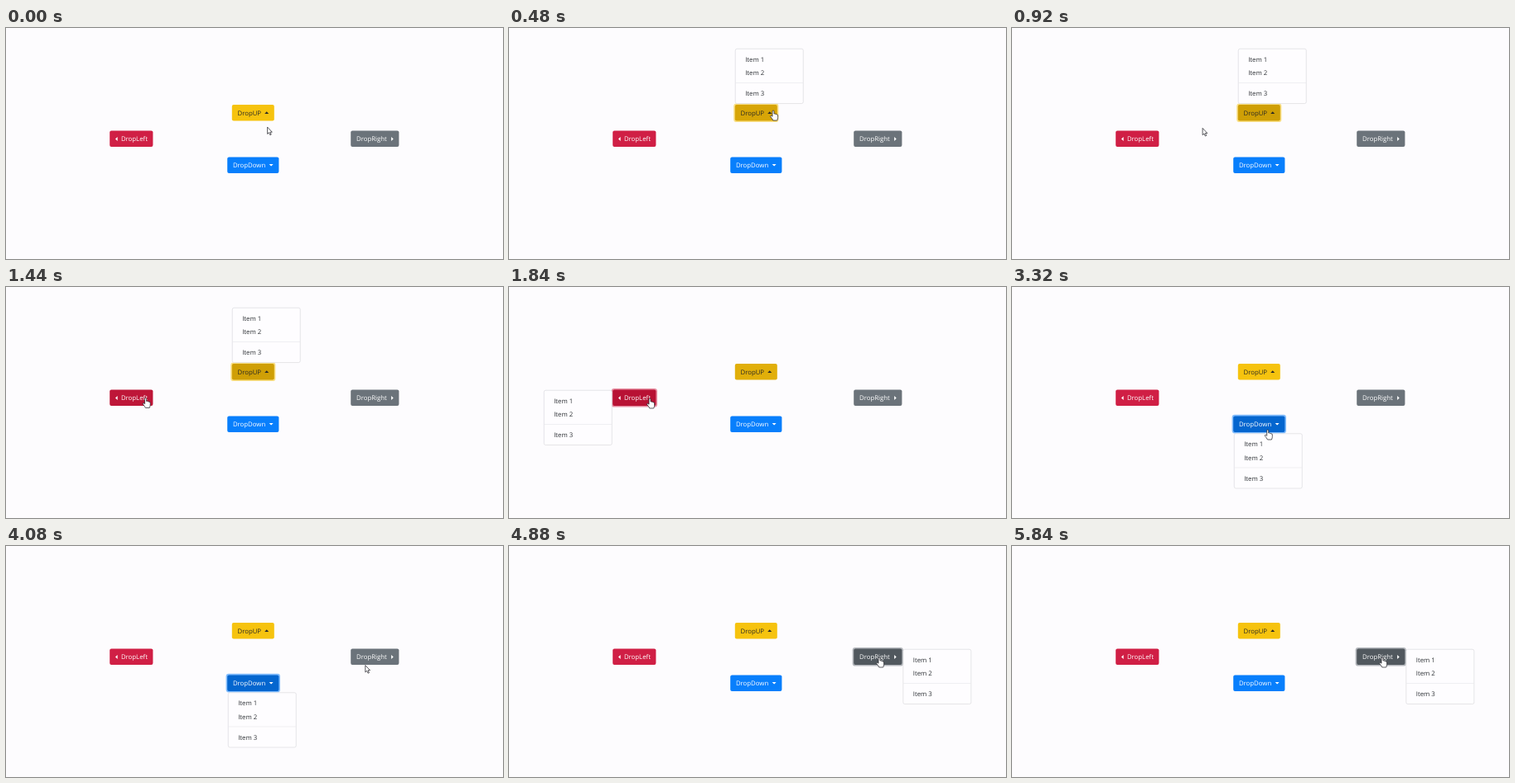
Animation of 600x280 px, one loop 5880 ms. Source, as an HTML page:

```html
<!DOCTYPE html>
<html lang="en">
<head>
<meta charset="utf-8">
<title>Dropdown directions</title>
<style>
  html, body { margin: 0; width: 100%; height: 100%; overflow: hidden; background: #fdfcfe; }
  svg { display: block; width: 100vw; height: 100vh; }
  text { font: 7.8px "Open Sans", "Noto Sans", sans-serif; text-rendering: geometricPrecision; }
</style>
</head>
<body>
<svg id="stage" viewBox="0 0 600 280"></svg>
<script>
const LOOP = 5880, STEP = 40, FADE = 150;
const stage = document.getElementById('stage');

// hover, focus and open are [start, end] times in ms
const buttons = [
  { label: 'DropUP', x: 272.8, y: 93, w: 51, tx: 279.5, caret: 'M312.2 103.9h5l-2.5 -2.6z',
    ink: '#2b2a24', base: [246, 195, 14], over: [224, 173, 8], dark: [207, 159, 6],
    menu: [273, 25], hover: [160, 760], focus: [330, 1660], open: [400, 1770] },
  { label: 'DropLeft', x: 125.2, y: 124.5, w: 52.2, tx: 138.9, caret: 'M134.6 132v5l-2.6 -2.5z',
    ink: '#fff', base: [208, 31, 69], over: [190, 22, 56], dark: [176, 14, 47],
    menu: [42, 125], hover: [1130, 2320], focus: [1660, 3080], open: [1770, 3160] },
  { label: 'DropDown', x: 267.2, y: 156.4, w: 62.2, tx: 273.9, caret: 'M317.6 164.9h5l-2.5 2.6z',
    ink: '#fff', base: [8, 127, 252], over: [6, 108, 220], dark: [4, 102, 207],
    menu: [268, 177.5], hover: [2790, 3715], focus: [3080, 4640], open: [3160, 4720] },
  { label: 'DropRight', x: 416.2, y: 124.5, w: 58.2, tx: 423, caret: 'M465.1 132v5l2.6 -2.5z',
    ink: '#fff', base: [107, 115, 122], over: [91, 98, 104], dark: [81, 88, 94],
    menu: [475.6, 125], hover: [4230, LOOP], focus: [4640, LOOP], open: [4720, LOOP] }
];

// pointer tip: time, x, y
const path = [
  [0, 315.3, 119.7], [60, 315.3, 119.7], [320, 319, 100], [640, 319, 100],
  [920, 229.8, 121], [1200, 160, 131], [1480, 170, 135], [2080, 170, 135],
  [2400, 150, 147], [2640, 237, 168.8], [2960, 308.7, 173], [3640, 308.7, 173],
  [4080, 433.5, 144.2], [4220, 436, 144.2], [4460, 447, 135], [LOOP, 447, 135]
];

function add(parent, tag, attrs, content) {
  const el = document.createElementNS('http://www.w3.org/2000/svg', tag);
  for (const key in attrs) el.setAttribute(key, attrs[key]);
  if (content) el.textContent = content;
  parent.appendChild(el);
  return el;
}

function makeMenu([x, y]) {
  const g = add(stage, 'g', { transform: `translate(${x} ${y})` });
  add(g, 'rect', { x: 0.25, y: 0.25, width: 82, height: 66.3, rx: 2, fill: '#fefdff', stroke: '#d6d5d8', 'stroke-width': 0.6 });
  add(g, 'path', { d: 'M.5 41.5h81.5', stroke: '#e6e6ea', 'stroke-width': 0.6 });
  [15.7, 32, 57.1].forEach((ty, i) => add(g, 'text', { x: 12.2, y: ty, fill: '#2c3034' }, `Item ${i + 1}`));
  return g;
}

add(stage, 'rect', { width: 600, height: 280, fill: '#fdfcfe' });
for (const b of buttons) {
  const h = 19.5;
  b.ring = add(stage, 'rect', { x: b.x - 1.6, y: b.y - 1.6, width: b.w + 3.2, height: h + 3.2, rx: 3.4, fill: `rgb(${b.base})` });
  b.gap = add(stage, 'rect', { x: b.x, y: b.y, width: b.w, height: h, rx: 2 });
  add(stage, 'text', { x: b.tx, y: b.y + 12.6, fill: b.ink }, b.label);
  add(stage, 'path', { d: b.caret, fill: b.ink });
  b.list = makeMenu(b.menu);
}

const line = { fill: '#fff', stroke: '#26262c', 'stroke-width': 0.75, 'stroke-linejoin': 'round' };
const arrow = add(stage, 'path', { ...line, d: 'M.3 .4V8.7L2.2 7L3.5 10L4.9 9.4L3.6 6.5H6z' });
const hand = add(stage, 'path', { ...line,
  d: 'M-1 .9Q-1 0 0 0Q1 0 1 .9V4Q2.3 3.5 2.8 4.4Q4 4 4.3 5Q5.6 4.8 5.6 6V8.5Q5.6 10 4.7 12H-.2Q-1.5 9.5 -3.3 7.6Q-3.8 6.4 -2.6 6.3Q-1.8 6.3 -1 7.3z' });

const clamp = v => Math.max(0, Math.min(1, v));
const inside = (t, [a, b]) => t >= a && t < b;
const mix = (a, b, k) => a.map((v, i) => v + (b[i] - v) * k);

// eased 0..1 level that fades in at the start and out at the end
function level(t, [a, b]) {
  const ease = p => p * p * (3 - 2 * p);
  return ease(clamp((t - a) / FADE)) * (1 - ease(clamp((t - b) / FADE)));
}

function tipAt(t) {
  let i = 1;
  while (i < path.length - 1 && path[i][0] <= t) i++;
  const [t0, ...from] = path[i - 1], [t1, ...to] = path[i];
  return mix(from, to, clamp((t - t0) / (t1 - t0)));
}

function draw(t) {
  for (const b of buttons) {
    const color = mix(mix(b.base, b.over, level(t, b.hover)), b.dark, level(t, b.open));
    b.gap.setAttribute('fill', `rgb(${color.map(Math.round)})`);
    b.ring.setAttribute('opacity', 0.5 * level(t, b.focus));
    b.list.setAttribute('visibility', inside(t, b.open) ? 'visible' : 'hidden');
  }
  const pointing = buttons.some(b => inside(t, b.hover));
  const [x, y] = tipAt(t);
  for (const el of [arrow, hand]) el.setAttribute('transform', `translate(${x} ${y})`);
  arrow.setAttribute('visibility', pointing ? 'hidden' : 'visible');
  hand.setAttribute('visibility', pointing ? 'visible' : 'hidden');
}

const start = performance.now();
function tick() {
  const t = (performance.now() - start) % LOOP;
  draw(Math.floor(t / STEP) * STEP);
  requestAnimationFrame(tick);
}
tick();
</script>
</body>
</html>
```
